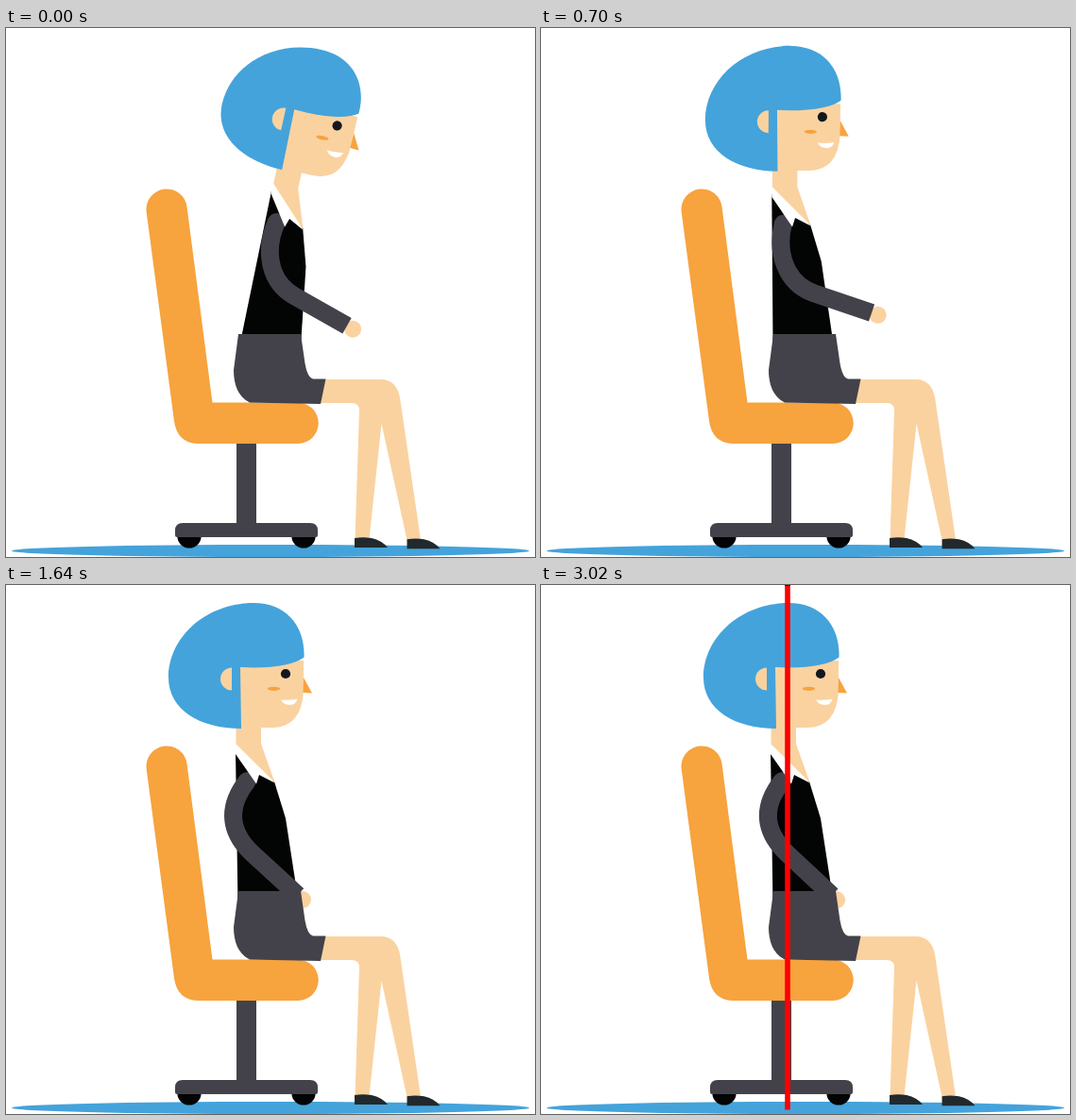
Recreate the animation shown at these times as an HTML page. Size 560x560 px, loop 6 s.

```html
<!DOCTYPE html>
<html lang="en">
<head>
<meta charset="utf-8">
<title>Sitting upright</title>
<style>
html, body { margin: 0; width: 100%; height: 100%; overflow: hidden; background: #fff; }
svg { display: block; width: 100vw; height: 100vh; }
.skin { fill: #fad2a0; }
.grey { fill: #43424a; }
.orange { fill: #f7a33e; }
.blue { fill: #44a3db; }
.black { fill: #030404; }
.white { fill: #fff; }
.shoe { fill: #22292d; }
</style>
</head>
<body>
<svg viewBox="0 0 560 560">
  <ellipse class="blue" cx="280" cy="553.5" rx="274" ry="6.5"/>
  <circle class="black" cx="194" cy="538" r="12.6"/>
  <circle class="black" cx="315" cy="538" r="12.6"/>
  <path class="grey" d="M244 438H265V524H322Q330 524 330 532V537Q330 539 328 539H181Q179 539 179 537V532Q179 524 187 524H244Z"/>
  <path class="orange" d="M148.7 195A21.6 21.6 0 0 1 191.5 189L218.5 396.5H309A21.7 21.7 0 0 1 309 440H203Q181 439 178 416Z"/>

  <g id="body">
    <path class="black" d="M243 176L245.5 340H310L308 325L296 247L284 208L262 190Z"/>
    <circle id="hand" class="skin" r="9"/>
    <path id="arm" fill="none" stroke="#43424a" stroke-width="19"/>
    <circle class="grey" cx="255.3" cy="207.5" r="9.5"/>
    <path class="white" d="M243 167V179L265 210.5L268 201L284.5 209.5L262 180Z"/>
    <path class="skin" d="M243.5 148H270V168L284.5 209L243.5 168.5Z"/>
    <path class="skin" d="M246 80H315V112Q313 150 283 151H246Z"/>
    <path class="orange" d="M315 98L324 114.5L314.5 114Z"/>
    <path class="blue" d="M249 152C205 152 172 132 172 98C172 55 212 19 262 19C297 19 317 44 315.5 76.5Q302 87 262 87.5L248 87Z"/>
    <path class="skin" d="M239 87.5A12 12 0 0 0 239 111.5Z"/>
    <circle cx="296" cy="94" r="5.1" fill="#12191d"/>
    <ellipse class="orange" cx="283.5" cy="109.8" rx="6.7" ry="2.1"/>
    <path class="white" d="M291 121.5Q300 122.5 308.5 120.8Q307 127 300.5 127Q293.5 126.5 291 121.5Z"/>
  </g>

  <path class="skin" d="M334 372H397Q413 372 417 391L439 542H424.5L397.5 419L384.5 541H369.5L374 405Q374 397 366 397H332Z"/>
  <path class="grey" d="M246 324H312L316.5 355Q319 370 325 371.5H338.5L333 398L258 396.5Q241 388 241 362Z"/>
  <path id="shoe" class="shoe" d="M369 540Q378 538.5 387 540Q398 542.5 404 550H369Z"/>
  <use href="#shoe" x="55.5" y="1.3"/>

  <rect id="line" x="258.2" width="5.6" fill="#f00"/>
  <rect id="cap" x="258" width="6" height="1" fill="#222"/>
</svg>
<script>
const $ = id => document.getElementById(id);
const set = (id, attrs) => {
  for (const k in attrs) $(id).setAttribute(k, attrs[k]);
};

// Hermite curve through [time, value, slope] keys, held at both ends
function curve(keys, t) {
  const i = keys.findIndex(k => k[0] > t);
  if (i === 0) return keys[0][1];
  if (i < 0) return keys[keys.length - 1][1];
  const [t0, a, m0] = keys[i - 1], [t1, b, m1] = keys[i];
  const d = t1 - t0, p = (t - t0) / d, s = p * p * (3 - 2 * p);
  return a + (b - a) * s + d * p * (1 - p) * (m0 * (1 - p) - m1 * p);
}

const LEAN = [[0, 12.5, 0], [250, 15.5, 0], [560, 6.5, -.05], [870, -2.7, 0], [1240, 0, 0]];
const REACH = [[300, 0, 0], [880, .2, .0012], [1200, .69, .0012], [1820, 1, 0]];
const TOP = [[2000, 560, 0], [2240, 522, -.4], [2620, 42, -.4], [3020, 1, 0]];
const BOTTOM = [[2400, 560, 0], [2620, 555.5, 0]];
const FADE = [[2000, 0, .0027], [2370, 1, .0027]];

function drawArm(q) {
  const angle = (17 + 26 * q) * Math.PI / 180;
  const x = 352 - 44 * q, y = 298.5 + 30 * q + 20 * q * (1 - q);
  const along = d => [x + d * Math.cos(angle), y + d * Math.sin(angle)];
  const [hx, hy] = along(7);
  set('hand', { cx: hx, cy: hy });
  set('arm', { d: `M255.3 207.5C${249.3 - 25 * q + 8 * q * q} 236.5 ${along(-97)} ${along(-64)}L${x} ${y}` });
}

function draw(t) {
  set('body', { transform: `rotate(${curve(LEAN, t)} 280 348)` });
  drawArm(curve(REACH, t));
  const top = curve(TOP, t);
  const p = Math.min(1, Math.max(0, (t - 2620) / 400));
  const swing = -1.2 * (1 - p) * Math.sin(2 * Math.PI * p);
  set('line', {
    y: top,
    height: Math.max(0, curve(BOTTOM, t) - top),
    opacity: curve(FADE, t),
    transform: `rotate(${swing} 261 555.5)`
  });
  set('cap', { opacity: t >= 3000 ? 1 : 0 });
}

const start = performance.now();
function tick() {
  draw((performance.now() - start) % 6000);
  requestAnimationFrame(tick);
}
tick();
</script>
</body>
</html>
```
